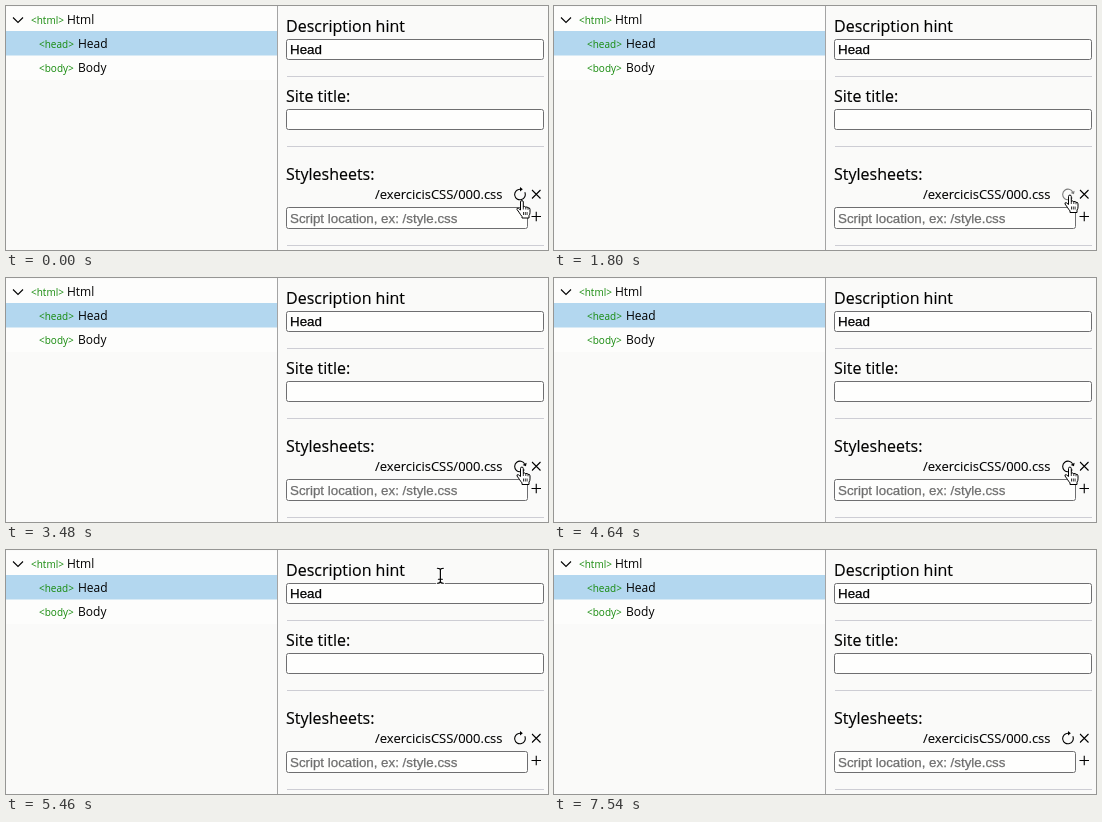
Animation of 542x244 px, one loop 7640 ms. Source, as an HTML page:

```html
<!DOCTYPE html>
<html lang="en">
<head>
<meta charset="utf-8">
<title>Stylesheet refresh</title>
<style>
  html, body { margin: 0; width: 100%; height: 100%; overflow: hidden; background: #fafaf9; }
  svg { display: block; width: 542px; height: 244px; font-family: "Open Sans", "Noto Sans", sans-serif; white-space: pre; }
  .label { font-size: 16px; stroke: #000; stroke-width: .15; }
  .path { font-size: 13px; stroke: #000; stroke-width: .1; }
  .node { font-size: 12px; }
  .tag { font-size: 10px; fill: #168a0c; }
  .field { font: 13.333px "Liberation Sans", Arial, sans-serif; stroke: currentColor; stroke-width: .25; }
  .hint { fill: #6e6e6e; color: #6e6e6e; }
  .box { fill: #fefefd; stroke: #6e6e70; }
  .rule { stroke: #cdcdd4; }
  .line { fill: none; stroke: #000; stroke-width: 1.1; }
  .cursor { fill: #fff; stroke: #000; stroke-linejoin: round; }
  .halo { stroke: #fff; stroke-width: 3; }
  .ink { stroke: #000; stroke-width: 1.2; }
</style>
</head>
<body>
<svg viewBox="0 0 542 244">
  <rect width="542" height="244" fill="#fafaf9"/>
  <rect y="1" width="271" height="73" fill="#fdfdfc"/>
  <rect y="25" width="271" height="24.5" fill="#b3d7ef"/>
  <path d="M271.5 0V244" stroke="#a4a4a4"/>

  <path class="line" d="M7 11.5l5 5 5-5"/>
  <g id="tree"></g>

  <path class="rule" d="M281 70.5H538M281 140.5H538M281 239.5H538"/>
  <g class="label">
    <text x="280" y="26">Description hint</text>
    <text x="280" y="96">Site title:</text>
    <text x="280" y="174">Stylesheets:</text>
  </g>
  <g class="box">
    <rect x="280.5" y="33.5" width="257" height="20" rx="2"/>
    <rect x="280.5" y="103.5" width="257" height="20" rx="2"/>
    <rect x="280.5" y="201.5" width="241" height="21" rx="2"/>
  </g>
  <text class="field" x="284" y="48">Head</text>
  <text class="field hint" x="284" y="217">Script location, ex: /style.css</text>
  <text class="path" x="496.5" y="193" text-anchor="end">/exercicisCSS/000.css</text>

  <g id="refresh">
    <path class="line" d="M0 -5.3A5.3 5.3 0 1 0 4.8 -2.2"/>
    <path d="M0 -7.6L2.800 -5.3 0 -3z"/>
  </g>
  <path class="line" d="M526 184l8.500 8.500M534.500 184l-8.500 8.500M525.500 210.500h9.500M530.250 205.750v9.500"/>

  <g id="hand" class="cursor">
    <path d="M4.500 10V2a1.400 1.400 0 0 1 2.800 0V7q1.300-1.200 2.500.2 1.400-.8 2.200.6 2-.4 2 1.600v3q0 2-1 3.200v2.400h-7v-1.600q-1.500-1.600-2.600-3.600l-2.400-3.300q-.4-1.800 1.400-1.200z"/>
    <path fill="none" stroke-width=".8" d="M7.300 7v2.500M9.800 7.200v2.300M12 7.800v2M7.500 12v3M9.300 12v3M11.100 12v3"/>
  </g>
  <g id="beam" fill="none" stroke-linecap="round">
    <defs><path id="stem" d="M-3-7.500q3 0 3 2V5.500q0 2-3 2M3-7.500q-3 0-3 2M0 5.500q0 2 3 2M-2 3.500h4"/></defs>
    <use href="#stem" class="halo"/>
    <use href="#stem" class="ink"/>
  </g>
  <path id="arrow" d="M0 0V14l3.300-3 2.300 5.300 2.300-1L5.600 10.200H10z" stroke="#fff"/>
</svg>
<script>
const LOOP = 7640;
const SPIN = { start: 1800, end: 2600, rest: 60 };
const $ = id => document.getElementById(id);

$("tree").innerHTML = [["html", 25, 61, 18], ["head", 33, 72, 42], ["body", 33, 72, 66]]
  .map(([name, tagX, x, y]) =>
    `<text class="tag" x="${tagX}" y="${y}">&lt;${name}&gt;</text>` +
    `<text class="node" x="${x}" y="${y}">${name[0].toUpperCase() + name.slice(1)}</text>`)
  .join("");

// Pointer hot spot: [time, x, y]
const track = [
  [0, 515.500, 194], [800, 515.500, 194], [840, 515.500, 188.500],
  [4760, 515.500, 188.500], [5060, 502, 150], [5460, 434.500, 26], [5640, 412, -22]
];
const textBands = [[8, 56], [80, 126], [158, 224]];

function pointerAt(t) {
  const i = track.findIndex(key => key[0] > t);
  if (i < 0) return null;
  const [t0, x0, y0] = track[i - 1], [t1, x1, y1] = track[i];
  const k = (t - t0) / (t1 - t0);
  return [x0 + (x1 - x0) * k, y0 + (y1 - y0) * k];
}

function cursorFor(x, y) {
  if (x > 506 && y > 181) return "hand";
  return textBands.some(([top, bottom]) => y > top && y < bottom) ? "beam" : "arrow";
}

// The icon turns once after the click and stays tilted while hovered.
function iconAngle(t, hovered) {
  if (t < SPIN.start || !hovered) return 0;
  const turn = Math.min(1, (t - SPIN.start) / (SPIN.end - SPIN.start));
  return SPIN.rest + 360 * turn;
}

function draw(now) {
  const t = now % LOOP;
  const point = pointerAt(t);
  const kind = point && cursorFor(...point);
  const spinning = t >= SPIN.start && t < SPIN.end;

  $("refresh").setAttribute("transform", `translate(514 188.500) rotate(${iconAngle(t, kind === "hand")})`);
  $("refresh").setAttribute("opacity", spinning ? 0.5 : 1);

  for (const id of ["hand", "beam", "arrow"]) {
    $(id).style.display = id === kind ? "" : "none";
  }
  if (point) {
    const [x, y] = point;
    const shift = kind === "hand" ? 5.500 : 0;
    $(kind).setAttribute("transform", `translate(${x - shift} ${y})`);
  }
  requestAnimationFrame(() => draw(performance.now()));
}
draw(0);
</script>
</body>
</html>
```
